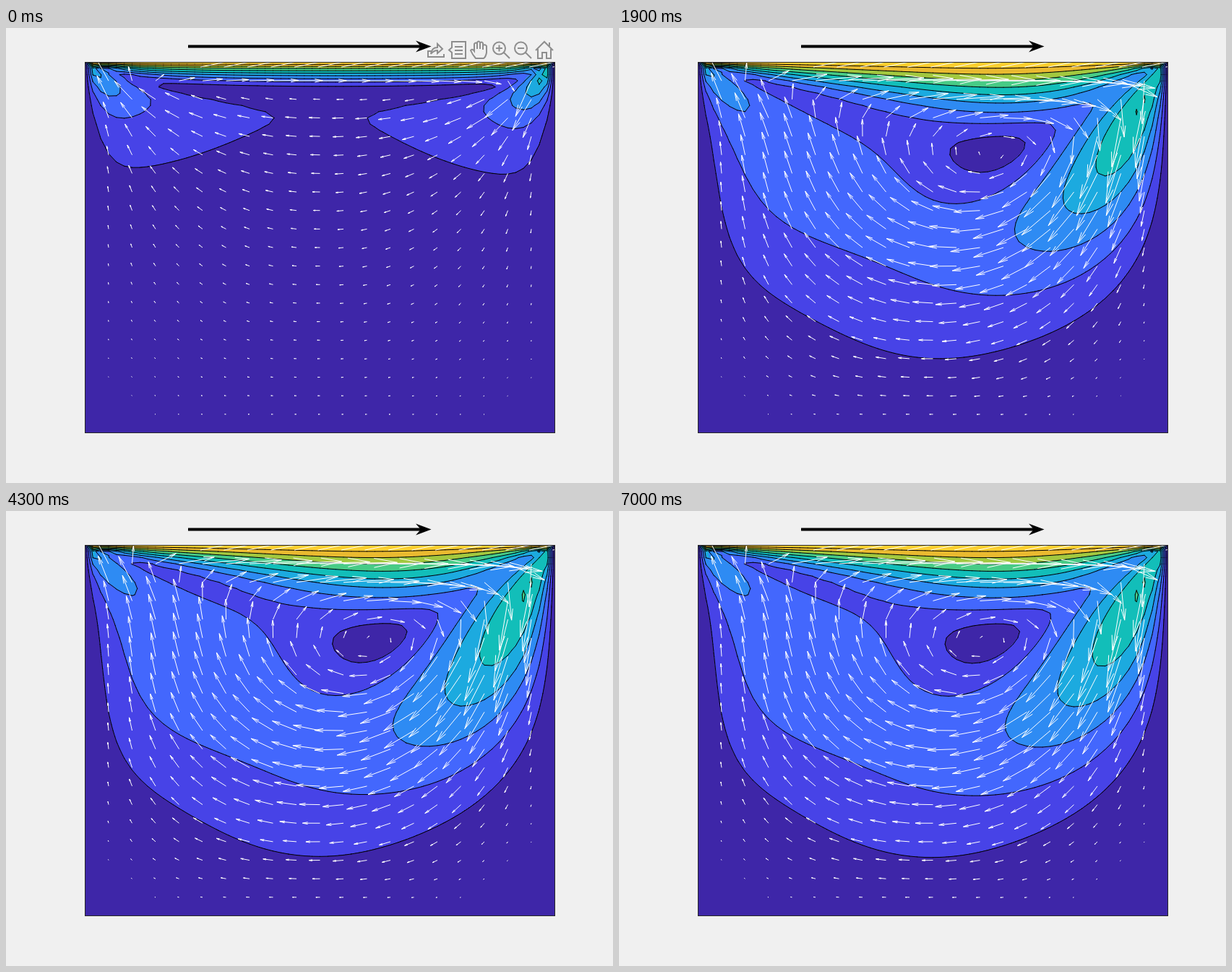
Recreate the animation shown at these times as an HTML page with a canvas. Size 840 px wide and 630 px high, loop 7100 ms.

```html
<!DOCTYPE html>
<html lang="en">
<head>
<meta charset="utf-8">
<title>Lid-driven cavity flow</title>
<style>
  html, body { margin: 0; width: 100%; height: 100%; overflow: hidden; background: #f0f0f0; }
  canvas { display: block; }
</style>
</head>
<body>
<canvas id="stage" width="840" height="630"></canvas>
<script>
const ctx = document.getElementById('stage').getContext('2d');

// Plot box and timing
const X0 = 109.5, Y0 = 47.5, W = 650, H = 513;
const STEP_MS = 100, COUNT = 71;
const COLORS = [
  [62, 38, 168], [71, 67, 231], [67, 103, 253], [46, 139, 243], [28, 170, 223],
  [18, 190, 185], [72, 203, 134], [162, 200, 63], [234, 186, 48], [254, 207, 48]
];

// Vorticity / stream function solver on the unit square, y pointing down
const N = 60, M = N + 1, h = 1 / N, NU = 0.01, DT = 0.005;
const FIRST_STEPS = 24, SUBSTEPS = 40;
const LEAK = 0.0105; // flux drawn through the lid corners
const grid = () => new Float64Array(M * M);
const psi = grid(), u = grid(), v = grid(), hat = grid();
let w = grid(), next = grid();

const sine = grid();
for (let k = 0; k <= N; k++)
  for (let i = 0; i <= N; i++) sine[k * M + i] = Math.sin(Math.PI * k * i / N);

// Tridiagonal factors for each sine mode
const factor = grid();
for (let k = 1; k < N; k++) {
  const diag = 4 - 2 * Math.cos(Math.PI * k / N);
  for (let j = 1; j < N; j++) factor[j * M + k] = 1 / (diag - factor[(j - 1) * M + k]);
}

function transform(from, to, scale) {
  for (let j = 1; j < N; j++) {
    const row = j * M;
    for (let k = 1; k < N; k++) {
      const base = k * M;
      let sum = 0;
      for (let i = 1; i < N; i++) sum += sine[base + i] * from[row + i];
      to[row + k] = sum * scale;
    }
  }
}

function solveStream() {
  transform(w, hat, h * h);
  for (let k = 1; k < N; k += 2) hat[M + k] += LEAK / Math.tan(Math.PI * k / (2 * N));
  for (let k = 1; k < N; k++) {
    for (let j = 1; j < N; j++) {
      const c = j * M + k;
      hat[c] = (hat[c] + (j > 1 ? hat[c - M] : 0)) * factor[c];
    }
    for (let j = N - 2; j > 0; j--) {
      const c = j * M + k;
      hat[c] += factor[c] * hat[c + M];
    }
  }
  transform(hat, psi, 2 / N);
}

function updateVelocity() {
  for (let j = 1; j < N; j++)
    for (let i = 1; i < N; i++) {
      const c = j * M + i;
      u[c] = (psi[c + M] - psi[c - M]) * N / 2;
      v[c] = (psi[c - 1] - psi[c + 1]) * N / 2;
    }
}

function advance() {
  const wall = -2 * N * N;
  for (let i = 0; i <= N; i++) {
    w[i] = wall * (psi[M + i] - LEAK - h);
    w[N * M + i] = wall * psi[(N - 1) * M + i];
    w[i * M] = wall * psi[i * M + 1];
    w[i * M + N] = wall * psi[i * M + N - 1];
  }
  for (let j = 1; j < N; j++)
    for (let i = 1; i < N; i++) {
      const c = j * M + i, a = w[c], l = w[c - 1], r = w[c + 1], t = w[c - M], b = w[c + M];
      next[c] = a + DT * (NU * N * N * (l + r + t + b - 4 * a)
        - N / 2 * (u[c] * (r - l) + v[c] * (b - t)));
    }
  [w, next] = [next, w];
  solveStream();
  updateVelocity();
}

// Moving lid
u.fill(1, 1, N);
psi.fill(LEAK, 1, N);
solveStream();
updateVelocity();

const history = [];
function flowAt(index) {
  while (history.length <= index) {
    const steps = history.length ? SUBSTEPS : FIRST_STEPS;
    for (let s = 0; s < steps; s++) advance();
    history.push({ u: Float32Array.from(u), v: Float32Array.from(v) });
  }
  return history[index];
}

// Filled bands
const image = ctx.createImageData(W, H);
function drawBands(speed) {
  const px = image.data;
  let p = 0;
  for (let y = 0; y < H; y++) {
    const gy = (y + 0.5) / H * N, j = Math.floor(gy), fy = gy - j;
    for (let x = 0; x < W; x++) {
      const gx = (x + 0.5) / W * N, i = Math.floor(gx), fx = gx - i, c = j * M + i;
      const top = speed[c] + (speed[c + 1] - speed[c]) * fx;
      const low = speed[c + M] + (speed[c + M + 1] - speed[c + M]) * fx;
      const col = COLORS[Math.min(9, Math.floor((top + (low - top) * fy) * 10))];
      px[p++] = col[0]; px[p++] = col[1]; px[p++] = col[2]; px[p++] = 255;
    }
  }
  ctx.putImageData(image, Math.floor(X0), Math.floor(Y0));
}

// Contour lines by marching squares
function drawContours(speed) {
  const sx = W / N, sy = H / N;
  ctx.beginPath();
  for (let j = 0; j < N; j++)
    for (let i = 0; i < N; i++) {
      const c = j * M + i;
      const corners = [[i, j, speed[c]], [i + 1, j, speed[c + 1]],
        [i + 1, j + 1, speed[c + M + 1]], [i, j + 1, speed[c + M]]];
      const values = corners.map(q => q[2]);
      const lo = Math.min(...values), hi = Math.max(...values);
      for (let n = Math.max(1, Math.ceil(lo * 10)); n < 10 && n / 10 < hi; n++) {
        const level = n / 10, cuts = [];
        for (let e = 0; e < 4; e++) {
          const a = corners[e], b = corners[(e + 1) % 4];
          if ((a[2] < level) === (b[2] < level)) continue;
          const f = (level - a[2]) / (b[2] - a[2]);
          cuts.push([X0 + sx * (a[0] + f * (b[0] - a[0])), Y0 + sy * (a[1] + f * (b[1] - a[1]))]);
        }
        for (let s = 0; s + 1 < cuts.length; s += 2) {
          ctx.moveTo(...cuts[s]);
          ctx.lineTo(...cuts[s + 1]);
        }
      }
    }
  ctx.strokeStyle = '#000';
  ctx.lineWidth = 1;
  ctx.lineCap = 'round';
  ctx.stroke();
}

function drawVectors(flow) {
  const stride = N / 20, reach = 160, aspect = H / W;
  ctx.beginPath();
  for (let j = 0; j <= N; j += stride)
    for (let i = 0; i <= N; i += stride) {
      const c = j * M + i;
      const dx = flow.u[c] * reach, dy = flow.v[c] * reach * aspect, len = Math.hypot(dx, dy);
      if (len < 0.6) continue;
      const x = X0 + i * W / N, y = Y0 + j * H / N, tx = x + dx, ty = y + dy;
      const back = Math.min(0.3, 33 / len), side = back * 0.2;
      ctx.moveTo(x, y);
      ctx.lineTo(tx, ty);
      ctx.moveTo(tx - back * dx + side * dy, ty - back * dy - side * dx);
      ctx.lineTo(tx, ty);
      ctx.lineTo(tx - back * dx - side * dy, ty - back * dy + side * dx);
    }
  ctx.strokeStyle = '#fff';
  ctx.lineCap = 'butt';
  ctx.stroke();
}

function drawLidArrow() {
  ctx.fillStyle = '#000';
  ctx.fillRect(252, 23.5, 323, 4);
  ctx.fill(new Path2D('M588.5 25.4 L567 17.4 L574 25.4 L567 33.4 Z'));
}

// Axes toolbar, shown only at the start
const ICONS = new Path2D(
  'M588 32 H584 V40 H606 V36 M588 36 Q589 27 597 27 V22 L604 29 L597 35 V31 Q592 31 588 36' +
  'M617 19 H636 V42 H617 V34 L613 30.5 L617 27 Z M621 26 H632 M621 31 H632 M621 36 H632' +
  'M650 42 Q645 36 643 31 Q645 28 648 32 V22 Q650 19 652 22 V29 V20 Q654 17 656 20 V29 V21' +
  'Q658 18 660 21 V30 V24 Q663 22 665 25 V34 Q664 40 661 42 Z' +
  'M691 28 A8.5 8.5 0 1 1 674 28 A8.5 8.5 0 1 1 691 28 M689 34 L697 42 M678 28 H687 M682.5 23.5 V32.5' +
  'M721 28 A8.5 8.5 0 1 1 704 28 A8.5 8.5 0 1 1 721 28 M719 34 L727 42 M708 28 H717' +
  'M733 31 L745 19 L757 31 M736 29 V42 H742 V34 H748 V42 H754 V29 M752 25 V20'
);
function drawToolbar() {
  ctx.strokeStyle = '#8e8e8e';
  ctx.lineWidth = 2;
  ctx.stroke(ICONS);
}

function draw(index) {
  const flow = flowAt(index);
  const speed = flow.u.map((a, c) => Math.hypot(a, flow.v[c]));
  ctx.fillStyle = '#f0f0f0';
  ctx.fillRect(0, 0, 840, 630);
  drawBands(speed);
  ctx.save();
  ctx.beginPath();
  ctx.rect(X0 - 0.5, Y0 - 0.5, W + 1, H + 1);
  ctx.clip();
  drawContours(speed);
  drawVectors(flow);
  ctx.restore();
  ctx.strokeStyle = '#262626';
  ctx.lineWidth = 1;
  ctx.strokeRect(X0, Y0, W, H);
  drawLidArrow();
  if (index === 0) drawToolbar();
}

const start = performance.now();
let shown = -1;
function tick() {
  const index = Math.floor(Math.max(0, performance.now() - start) / STEP_MS) % COUNT;
  if (index !== shown) draw(shown = index);
  requestAnimationFrame(tick);
}
tick();
</script>
</body>
</html>
```
